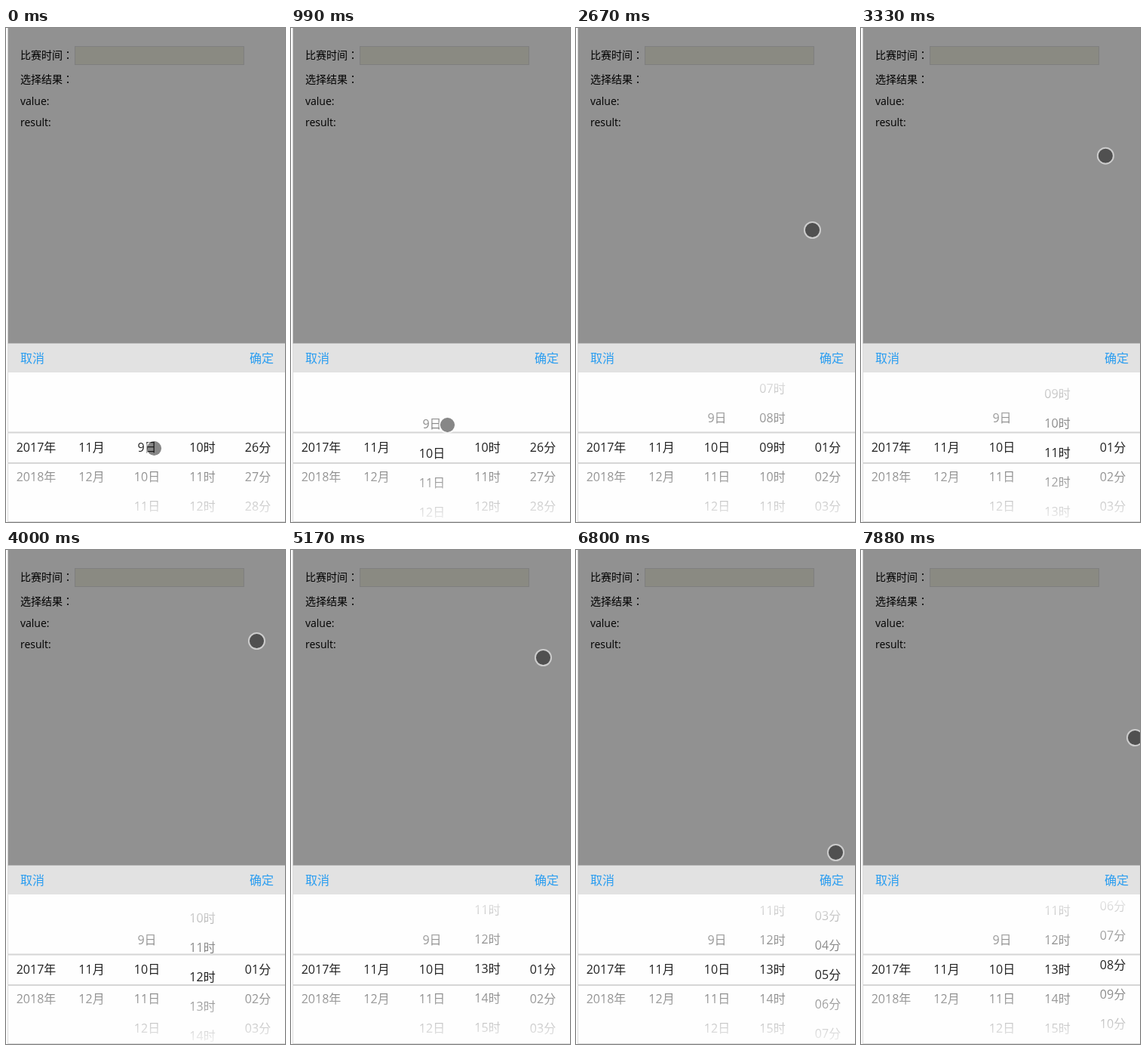
An HTML page with a canvas for the animation above (8 s loop, 370 by 654 pixels).

```html
<!DOCTYPE html>
<html lang="zh-CN">
<head>
<meta charset="utf-8">
<style>
html, body { margin: 0; height: 100%; overflow: hidden; background: #fff; }
canvas { display: block; }
</style>
</head>
<body>
<canvas id="stage" width="370" height="654"></canvas>
<script>
const ctx = document.getElementById('stage').getContext('2d');
const FONT = '"Open Sans", "Noto Sans CJK SC", "Noto Sans CJK", sans-serif';
const LOOP = 8000, STEP = 140, ROW = 39, CENTER = 555, RESET = 1530;

// Each stroke moves the named values to their new place; the rest stay put.
const start = { x: 196, y: 556, day: 9, hour: 1, minute: 1 };
const strokes = [
  { from: 0, to: 990, x: 207, y: 525, day: 9.8 },
  { from: 1260, to: 1830, x: 278, y: 575, day: 10 },
  { from: 1830, to: 2670, x: 313, y: 267, hour: 9 },
  { from: 2670, to: 3460, x: 326, y: 149, hour: 11.2 },
  { from: 3600, to: 4000, x: 332, y: 120, hour: 11.75 },
  { from: 4000, to: 4450, x: 347, y: 74, hour: 12.93 },
  { from: 4600, to: 5170, x: 334, y: 142, hour: 13.02 },
  { from: 5170, to: 5480, x: 359, y: 360, hour: 13 },
  { from: 5480, to: 5790, x: 354, y: 556 },
  { from: 5960, to: 6800, x: 344, y: 400, minute: 4.82 },
  { from: 6800, to: 7880, x: 363, y: 248, minute: 8.15 },
];

// Progress of a stroke, in whole steps of about STEP ms
function progress({ from, to }, t) {
  const steps = Math.round((to - from) / STEP);
  const k = Math.min(1, Math.max(0, (t - from) / (to - from)));
  return Math.floor(k * steps + 1e-6) / steps;
}

function poseAt(t) {
  const pose = { ...start };
  for (const stroke of strokes) {
    const k = progress(stroke, t);
    for (const name in pose)
      if (name in stroke) pose[name] += (stroke[name] - pose[name]) * k;
  }
  return pose;
}

function rect(x, y, w, h, fill) {
  ctx.fillStyle = fill;
  ctx.fillRect(x, y, w, h);
}

function text(str, x, baseline, size, fill, align = 'left', font = FONT) {
  ctx.font = `${size}px ${font}`;
  ctx.textAlign = align;
  ctx.fillStyle = fill;
  ctx.fillText(str, x, baseline);
}

// The traditional face centres the full-width colon
function label(str, baseline) {
  text(str, 19, baseline, 14, '#000');
  text('：', 75, baseline, 14, '#000', 'left', '"Noto Sans CJK TC", sans-serif');
}

function wheel(column, unit, value, min, max) {
  const from = Math.max(min, Math.floor(value) - 3), to = Math.min(max, Math.ceil(value) + 3);
  for (let n = from; n <= to; n++) {
    const digits = column > 2 ? String(n).padStart(2, '0') : n;
    const baseline = CENTER + 6 + Math.round((n - value) * ROW);
    text(digits + unit, 40 + 73.5 * column, baseline, 16, '#222', 'center');
  }
}

function fade(y, h, top, bottom) {
  const g = ctx.createLinearGradient(0, y, 0, y + h);
  g.addColorStop(0, `rgba(254,254,254,${top})`);
  g.addColorStop(1, `rgba(254,254,254,${bottom})`);
  rect(3, y, 367, h, g);
}

function drawForm() {
  rect(0, 0, 370, 654, '#fefefe');
  rect(2.5, 0, 368, 418, '#919191');
  label('比赛时间', 41);
  label('选择结果', 73);
  text('value:', 19, 102, 14, '#000');
  text('result:', 19, 130, 14, '#000');
  rect(91, 24, 225, 25, '#7f7f7f');
  rect(92, 25, 223, 23, '#8a8a82');
}

function drawPicker({ day, hour, minute }, reset) {
  ctx.save();
  ctx.beginPath();
  ctx.rect(3, 456, 367, 197);
  ctx.clip();
  wheel(0, '年', 2017, 2017, 2018);
  wheel(1, '月', 11, 11, 12);
  wheel(2, '日', day, 9, 30);
  wheel(3, '时', reset ? hour : 10, reset ? 1 : 10, 23);
  wheel(4, '分', reset ? minute : 26, reset ? 1 : 26, 59);
  fade(456, 79, 0.95, 0.4);
  fade(576, 78, 0.4, 0.95);
  ctx.restore();

  for (const y of [534.5, 575]) rect(3, y, 367, 2, '#d6d6d6');
  rect(2, 418, 1, 236, '#dcdcdc');
  rect(2, 653, 368, 1, '#dcdcdc');
  rect(3, 417.5, 367, 38.5, '#e2e2e2');
  text('取消', 19, 443, 16, '#2a9df0');
  text('确定', 355, 443, 16, '#2a9df0', 'right');
}

function circle(x, y, r) {
  ctx.beginPath();
  ctx.arc(x + 0.5, y + 0.5, r, 0, 2 * Math.PI);
}

function drawTouch({ x, y }) {
  circle(x, y, 9.7);
  ctx.fillStyle = 'rgba(15,15,15,.5)';
  ctx.fill();
  circle(x, y, 10.5);
  ctx.lineWidth = 2;
  ctx.strokeStyle = 'rgba(255,255,255,.55)';
  ctx.stroke();
}

function frame() {
  const t = performance.now() % LOOP;
  const pose = poseAt(t);
  drawForm();
  drawPicker(pose, t >= RESET);
  drawTouch(pose);
  requestAnimationFrame(frame);
}
frame();
</script>
</body>
</html>
```
